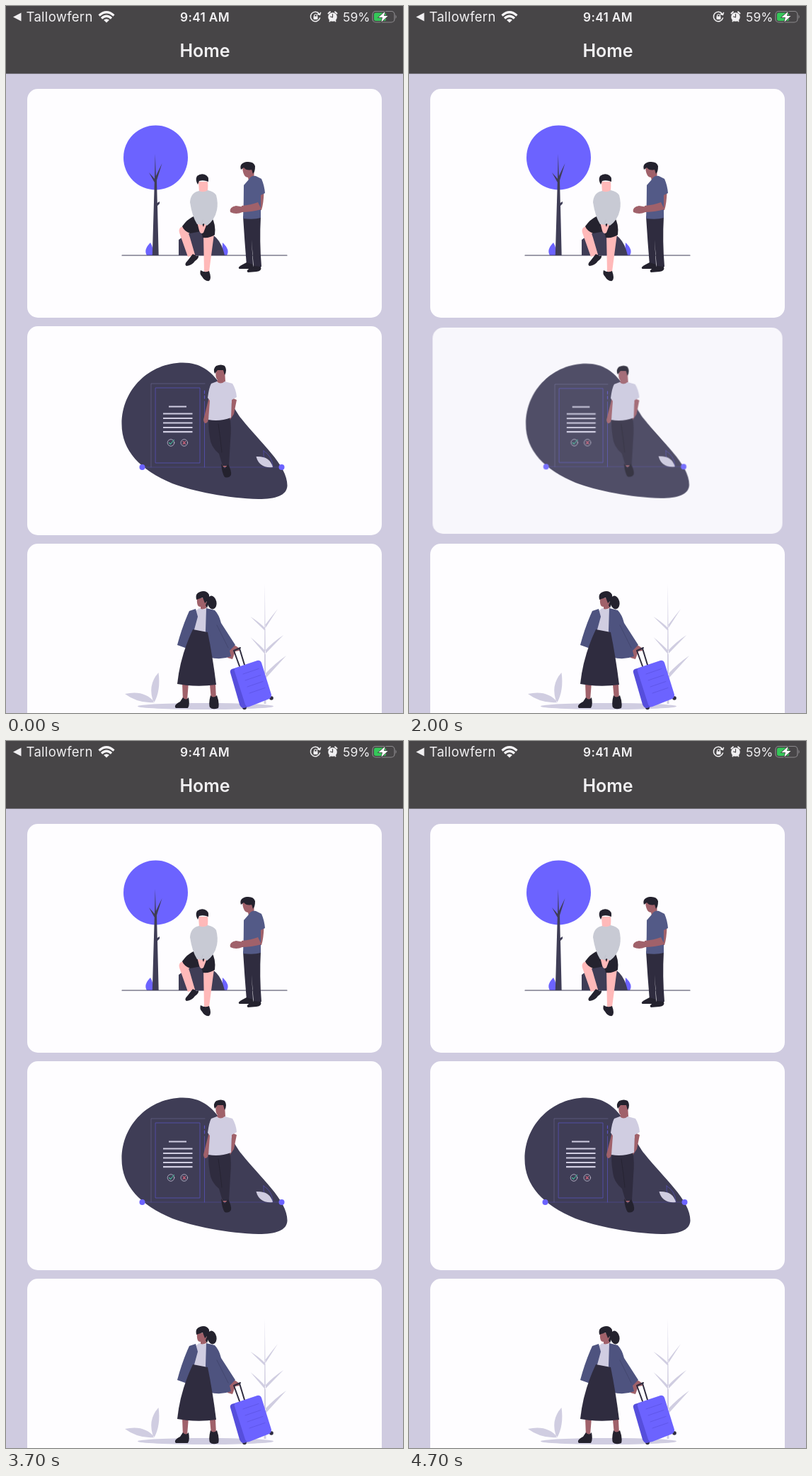
Write an HTML page that moves like this. It is 561 by 998 pixels and loops after 4.8 s.

```html
<!DOCTYPE html>
<html lang="en">
<head>
<meta charset="utf-8">
<title>Home</title>
<style>
html, body { margin: 0; width: 100%; height: 100%; overflow: hidden; background: #cfcbe0; }
svg { display: block; width: 100%; height: 100%; }
text { font-family: Inter, Roboto, "Liberation Sans", sans-serif; fill: #f1f0f2; }
.panel { fill: #fefdff; }
.violet { fill: #6c63ff; }
.ink { fill: #3f3d56; }
.dark { fill: #2f2c3f; }
.black { fill: #24222e; }
.pale { fill: #d0cde1; }
.brown { fill: #a0616a; }
.pink { fill: #ffb9b9; }
.blue { fill: #535a87; }
.line { fill: none; stroke-linecap: round; stroke-linejoin: round; }

.card { animation: 4800ms linear infinite; }
#talk { transform-origin: 280.5px 278px; animation-name: talk; }
#terms { transform-origin: 280.5px 599.5px; animation-name: terms; }

/* Presses advance on a 100 ms grid. */
@keyframes talk {
  0% { transform: scale(1); opacity: 1; }
  10.41% { transform: scale(1); opacity: 1; animation-timing-function: steps(2); }
  14.58% { transform: scale(.979); opacity: .8; animation-timing-function: steps(3); }
  20.83% { transform: scale(1); opacity: 1; }
  83.33% { transform: scale(1); opacity: 1; animation-timing-function: steps(2); }
  87.49% { transform: scale(.98); opacity: .81; animation-timing-function: steps(3); }
  93.74%, 100% { transform: scale(1); opacity: 1; }
}
@keyframes terms {
  0%, 37.49% { transform: scale(1); opacity: 1; animation-timing-function: steps(3); }
  43.74% { transform: scale(.98); opacity: .82; animation-timing-function: steps(3); }
  49.99% { transform: scale(1); opacity: 1; }
  60.41% { transform: scale(1); opacity: 1; animation-timing-function: steps(3); }
  66.66% { transform: scale(.982); opacity: .83; animation-timing-function: steps(3); }
  72.91%, 100% { transform: scale(1); opacity: 1; }
}
</style>
</head>
<body>
<svg viewBox="0 0 561 998" preserveAspectRatio="none">
  <rect width="561" height="998" fill="#cfcbe0"/>

  <g id="talk" class="card">
    <rect class="panel" x="30" y="117" width="501" height="323" rx="15"/>
    <circle class="violet" cx="211.5" cy="214" r="45.5"/>
    <!-- tree and bushes -->
    <path class="violet" d="M204 334Q194 344 199 352H208Q209 342 204 334ZM306 334Q317 344 312 352H305Z"/>
    <path class="ink" d="M210.8 209L211.8 240 220.5 222 213 246 213.800 278 217 276V279L214 282 215.700 352H206.800L209.800 249 202 235 210 244Z"/>
    <path class="ink" d="M244 352V330Q260 317 276 317Q302 320 309 352Z"/>
    <path class="line" d="M164 352H397" stroke="#3f3d56" stroke-width="1.2"/>
    <!-- seated figure -->
    <path class="pink" d="M250 311Q243 313 245 320L257 354 267 351 260 327 258 321 270 314ZM279 322L280 375H287L294 322Z"/>
    <path class="black" d="M265 297H290Q297 308 295 323Q288 328 278 327L276 318 260 321Q251 317 249 311Q256 301 265 297Z"/>
    <path class="black" d="M264 350Q269 354 272 352 273 356 267 360 263 366 255 367 251 365 257 359ZM275 373Q281 377 287 374 291 385 287 388 281 389 277 382 273 378 275 373Z"/>
    <path class="pink" d="M272 248H285Q286 258 284 264L273 263ZM270 305L276 305 279 312 281 306 284 307 279 320Q275 323 273 317Z"/>
    <path d="M273 261Q279 264 285 260 294 262 297 267 300 278 298 288 295 302 284 310L279 307 277 309 270 308Q263 297 260 277 261 263 273 261Z" fill="#c8cad4"/>
    <path class="line" d="M276 309L278 302" stroke="#babcc8" stroke-width=".6"/>
    <path class="black" d="M271 252Q267 245 270 240 275 236 281 238 287 240 286 248 279 245 273 247Z"/>
    <!-- standing figure -->
    <path class="brown" d="M334 227L350 228Q351 239 350 244L343 247 342 242Q335 242 334 227ZM356 262H364.500Q364 279 361 288 348 291 334 291 325 295 317 291 315 284 325 282L337 284 354 281Z"/>
    <path class="dark" d="M335 297H360Q358 332 361 368L350 370 347 330 349 365 340 366Q337 330 335 297Z"/>
    <path class="black" d="M340 362L349 365Q351 369 346 371H330Q325 369 340 362ZM351 367L360 368Q362 374 354 375L342 376Q337 373 351 367Z"/>
    <path class="blue" d="M343 245Q346 239 353 240L361 244Q365 253 366 264L360 267 360 299Q350 302 335 300 336 278 336 253Z"/>
    <path class="brown" d="M333 282Q346 281 356 277L361 287Q347 291 332 291Z"/>
    <path class="black" d="M332 231Q329 222 340 220 350 219 352 226 352 234 349 237L347 231Q340 233 336 228Z"/>
  </g>

  <g id="terms" class="card">
    <rect class="panel" x="30" y="452" width="501" height="295" rx="15"/>
    <path class="ink" d="M163.500 590C163.500 541 203 503.500 250 503.500C300 503.500 310 553 333 583C358 615 398 648 397.500 677C397 691 381 696 357 696C314 695 264 685 235 674C190 655 163.500 628 163.500 590Z"/>
    <g class="line" stroke="#5a53c4">
      <path d="M205 651V533H281" stroke="#77739c" stroke-width=".5"/>
      <path d="M280.500 558V651" stroke-width=".7"/>
      <path d="M211.500 539H274V645H211.500Z" stroke-width=".7"/>
      <path d="M280.500 543V547M280.500 550V554" stroke-width="1.2"/>
      <path d="M192 651H390" stroke-width=".4"/>
      <path d="M364 628Q376 635 377 650Q362 643 364 628Z" stroke-width=".6"/>
    </g>
    <path class="line" d="M230 565.500H255M222 575.500H263.500M222 582H263.500M222 588.500H263.500M222 595H263.500M222 601.200H263.500" stroke="#d0cde1" stroke-width="2.2" style="stroke-linecap:butt"/>
    <g class="line" stroke="#c4c1d4" stroke-width=".8">
      <circle cx="233" cy="616.500" r="4.800"/><circle cx="251.800" cy="616.500" r="4.800"/>
      <path d="M230.500 616.500L232.500 618.500 237.500 612.500" stroke="#45b898" stroke-width="1.100"/>
      <path d="M250 614.700L253.600 618.300M253.600 614.700L250 618.300" stroke="#d8667c" stroke-width="1.100"/>
    </g>
    <circle class="violet" cx="192.500" cy="651" r="4"/>
    <circle class="violet" cx="389.500" cy="651" r="4"/>
    <path class="pale" d="M353.500 636Q373 635 377 651Q358 653 353.500 636Z"/>
    <!-- leaning figure -->
    <path class="brown" d="M297 514H309L310 530 304 536 297 532 299 528Q295 524 297 514ZM287 552L293 556 285 587Q280 592 279 584ZM319 553L326 556 322 576 316 585 313 581 318 570ZM305 641H313V651H306Z"/>
    <path class="dark" d="M287 580H316Q319 592 317 614L315 649 306 649 301 632Q289 622 288 609Q285 591 287 580Z"/>
    <path class="line" d="M300 590L303 612 305 630" stroke="#252330" stroke-width=".8"/>
    <path class="black" d="M304 646L309 653 314 647Q319 656 318 662 315 667 309 665 305 659 304 646Z"/>
    <path class="pale" d="M298 530Q303 535 309 530L320 533Q325 541 326 552L319 556 318 581Q302 587 286 584L288 557 285 553Q287 538 290 533Z"/>
    <path class="black" d="M295 519Q292 512 297 508 304 505 309 508 313 514 309 521L307 514 299 514Z"/>
  </g>

  <g>
    <rect class="panel" x="30" y="759" width="501" height="280" rx="15"/>
    <g class="pale">
      <ellipse cx="282" cy="988.500" rx="96" ry="4.500"/>
      <path d="M215.500 941Q199 959 209 984Q219 966 215.500 941ZM168 971Q196 965 210 983Q187 985 168 971Z"/>
      <path d="M365.800 815L367.500 985H364.500ZM366 882L345.500 862Q358 870 366 878ZM366 879L384 851Q375 862 366 874ZM366 915L345.500 891Q359 902 366 910ZM366 915L392 888Q377 898 366 910ZM366 950L396 917Q380 928 366 943ZM366 952L349 930Q359 938 366 947Z"/>
    </g>
    <!-- traveller -->
    <path class="brown" d="M270 836L284 835 283 850 275 853 275 848Q269 849 270 836ZM249 955H258L256 980 250 981ZM288 958H296L297 978 290 979ZM315 907L322 902Q330 905 330 910L324 911 320 922 313 920Z"/>
    <path class="black" d="M250 976Q254 981 258 976 260 987 257 991L240 991Q236 987 246 982ZM289 973Q293 978 298 973 302 984 300 991 292 994 288 990 286 984 289 973Z"/>
    <path class="pale" d="M273 850Q279 853 284 850L288 885H264Q267 866 267 855Z"/>
    <path d="M268 851L259 854Q249 876 242 902L256 907 265 884 271 862ZM283 850L295 853Q301 859 304 871L324 902 316 910 318 918Q302 924 287 919L282 882Z" fill="#4e537f"/>
    <path class="line" d="M298 874L314 906" stroke="#3f436a" stroke-width=".8"/>
    <path class="dark" d="M264 880L285 884Q292 918 297 958Q270 962 242 957Q246 918 264 880Z"/>
    <path class="black" d="M269 838Q267 829 274 827 283 824 287 831 288 839 284 850L282 846 284 840 281 843 278 835Z"/>
    <ellipse class="black" cx="291" cy="842" rx="6.500" ry="9.500" transform="rotate(-12 291 842)"/>
    <!-- suitcase -->
    <path class="line" d="M322 910L330 932M330 907L337 930M322 910L331 906" stroke="#2f2c3f" stroke-width="2"/>
    <circle class="dark" cx="337" cy="990.500" r="2.800"/>
    <circle class="dark" cx="375" cy="977" r="2.800"/>
    <path d="M317 941Q316 938 319 936L326 934 343 989 336 991Q332 991 330 986Z" fill="#564edc"/>
    <path class="violet" d="M325 934L355 924Q359 923 361 927L375 972Q375 976 372 978L344 989Q340 990 338 986L323 939Q322 936 325 934Z"/>
    <path class="line" d="M335 943L357 935.500M338 952L360 944.500M341 961L363 953.500M344 970L366 962.500" stroke="#5a51e0" stroke-width=".7"/>
  </g>

  <!-- header -->
  <rect width="561" height="95.600" fill="#474547"/>
  <path d="M10 15.500L21.500 9.500V21.500Z" fill="#f1f0f2"/>
  <text x="28.500" y="21.500" font-size="18.500" letter-spacing=".3">Tallowfern</text>
  <g class="line" stroke="#f4f3f5" stroke-width="3.200" style="stroke-linecap:butt">
    <path d="M131.500 13.500Q142 4 152.500 13.500M135 17.500Q142 11 149 17.500"/>
    <path d="M138 19.800Q142 16.500 146 19.800L142 23.500Z" fill="#f4f3f5" stroke="none"/>
  </g>
  <text x="281" y="21.500" font-size="17.300" font-weight="600" text-anchor="middle" letter-spacing=".3">9:41 AM</text>
  <text x="281" y="71.500" font-size="25" font-weight="600" text-anchor="middle">Home</text>
  <g class="line" stroke="#f1f0f2" stroke-width="1.500">
    <path d="M442.500 11A6.700 6.700 0 1 0 443.500 17M440.500 11.500L443.500 12.500 444.500 9.500"/>
    <path d="M435.500 15V13Q437.500 10.500 439.500 13V15" stroke-width="1.200"/>
    <rect x="434.500" y="14.500" width="6" height="4.500" rx=".7" fill="#f1f0f2" stroke="none"/>
    <circle cx="461.500" cy="15.500" r="6.300" fill="#f1f0f2" stroke="none"/>
    <path d="M455.500 10.500L458 8.300M467.500 10.500L465 8.300M457.500 21.500L458 20M465.500 21.500L465 20" stroke-width="2"/>
    <path d="M461.500 11.500V16L458.500 15" stroke="#474547" stroke-width="1.200"/>
  </g>
  <text x="476" y="21.500" font-size="17.500">59%</text>
  <rect x="518" y="7.500" width="31" height="15.500" rx="4.500" fill="none" stroke="#8b898c" stroke-width="1.200"/>
  <path d="M550.500 12.500Q553 15 550.500 18Z" fill="#8b898c"/>
  <rect x="520" y="9.500" width="17" height="11.500" rx="2.500" fill="#35c759"/>
  <path d="M535.500 8L526.500 16H532L530.500 22.500 539.500 14H534Z" fill="#fff" stroke="#474547" stroke-width="1.500" paint-order="stroke"/>
</svg>
</body>
</html>
```
